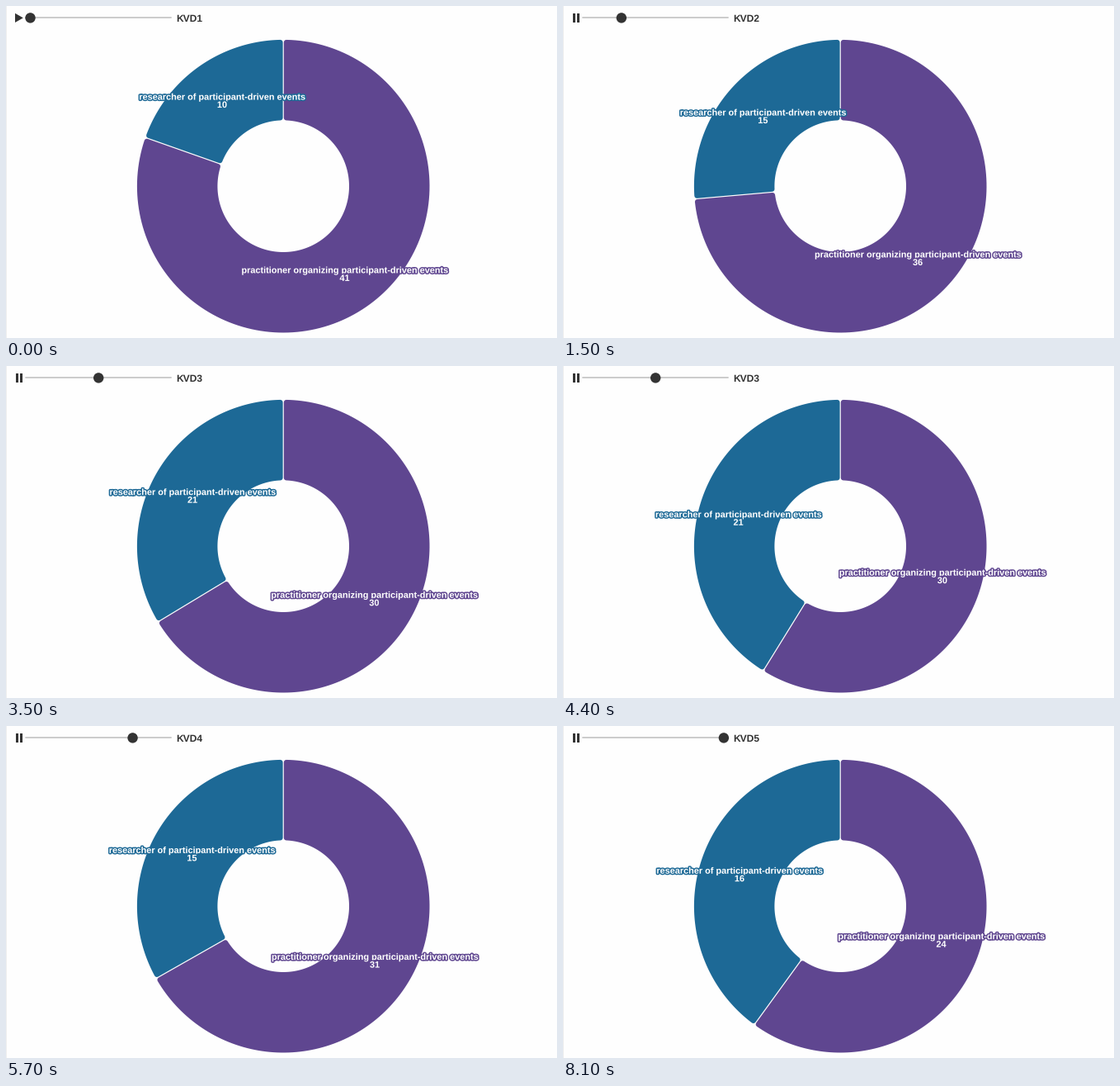
A matplotlib script for the animation above (8.9 s loop, 668 by 402 pixels).

```python
import numpy as np
import matplotlib.pyplot as plt
from matplotlib.animation import FuncAnimation
from matplotlib.patches import Circle, Polygon, Rectangle
from matplotlib.patheffects import withStroke

W, H, DPI = 668, 402, 100
STEP, LOOP = 100, 8900
PX = 72 / DPI  # points per pixel

BLUE, PURPLE, DARK = "#1d6996", "#5f4690", "#333333"
CX, CY, R_OUT, R_IN = 336.2, 218.2, 177.3, 79.8
CORNER, GAP = 3, 0.6

# researchers, practitioners
COUNTS = [(10, 41), (15, 36), (21, 30), (15, 31), (16, 24)]
SWITCH = [1300, 3000, 5400, 7400]   # slider and counts jump
START = [983, 3097, 5034, 7247]     # ring starts to turn
DURATION = 900

plt.rcParams["font.family"] = "Liberation Sans"
plt.rcParams["text.hinting"] = "none"
# the small margin keeps the pixel size from rounding down
fig = plt.figure(figsize=((W + 0.01) / DPI, (H + 0.01) / DPI), dpi=DPI,
                 facecolor="#fefefe")
ax = fig.add_axes([0, 0, 1, 1])
ax.set_xlim(0, W)
ax.set_ylim(H, 0)
ax.axis("off")


def ease(t):
    t = min(max(t, 0), 1)
    return 4 * t ** 3 if t < 0.5 else 1 - 4 * (1 - t) ** 3


def sweep(k):
    """Angle of the researcher slice, counter-clockwise from the top."""
    a, b = COUNTS[k]
    return 2 * np.pi * a / (a + b)


def polar(r, a):
    return np.column_stack([CX - r * np.sin(a), CY - r * np.cos(a)])


def sector(a0, a1):
    """Ring sector, inset so that a round stroke gives the soft corners."""
    def arc(r):
        pad = np.arcsin((CORNER + GAP) / r)
        return polar(r, np.linspace(a0 + pad, a1 - pad, 160))
    return np.vstack([arc(R_OUT - CORNER), arc(R_IN + CORNER)[::-1]])


def label_offset(k):
    mid, r = sweep(k) / 2, (R_OUT + R_IN) / 2
    return np.array([-r * np.sin(mid), -r * np.cos(mid)])


def add_slice(color):
    return ax.add_patch(Polygon([(0, 0), (1, 0), (0, 1)], fc=color, ec=color,
                                lw=2 * CORNER * PX, joinstyle="round"))


def add_text(color, text=""):
    halo = [withStroke(linewidth=3 * PX, foreground=color)]
    return ax.text(0, 0, text, color="white", weight="bold", size=10.9 * PX,
                   ha="center", va="baseline", path_effects=halo)


slices = [add_slice(BLUE), add_slice(PURPLE)]
names = [add_text(BLUE, "researcher of participant-driven events"),
         add_text(PURPLE, "practitioner organizing participant-driven events")]
values = [add_text(BLUE), add_text(PURPLE)]

# page edge and player controls
ax.add_patch(Rectangle((0, 0), 1, H, fc="#eeeeee", lw=0))
ax.plot([24, 200], [14, 14], color="#cccccc", lw=2 * PX,
        solid_capstyle="round")
play = ax.add_patch(Polygon([(11, 8.8), (11, 20), (20.8, 14.4)],
                            fc=DARK, lw=0))
bars = [ax.add_patch(Rectangle((x, 9.2), 3.2, 10.4, fc=DARK, lw=0))
        for x in (12, 17)]
knob = ax.add_patch(Circle((29.5, 14.4), 6.2, fc=DARK, lw=0, zorder=3))
title = ax.text(206, 18.8, "", color=DARK, weight="bold", size=12 * PX,
                va="baseline")


def draw(i):
    now = i * STEP
    k = sum(now >= s for s in SWITCH)
    prev = max(k - 1, 0)
    p = ease((now - START[k - 1]) / DURATION) if k else 0

    split = sweep(prev) + (sweep(k) - sweep(prev)) * p
    slices[0].set_xy(sector(0, split))
    slices[1].set_xy(sector(split, 2 * np.pi))

    offset = label_offset(prev) + (label_offset(k) - label_offset(prev)) * p
    for name, value, count, side in zip(names, values, COUNTS[k], (1, -1)):
        x, y = np.array([CX, CY]) + side * offset
        name.set_position((x, y + 0.3))
        value.set_position((x, y + 9.8))
        value.set_text(str(count))

    play.set_visible(k == 0)
    for bar in bars:
        bar.set_visible(k > 0)
    knob.center = (29.5 + 41.35 * k, 14.4)
    title.set_text(f"KVD{k + 1}")
    return []


anim = FuncAnimation(fig, draw, frames=LOOP // STEP, interval=STEP,
                     repeat=True, repeat_delay=0)
plt.show()
```
